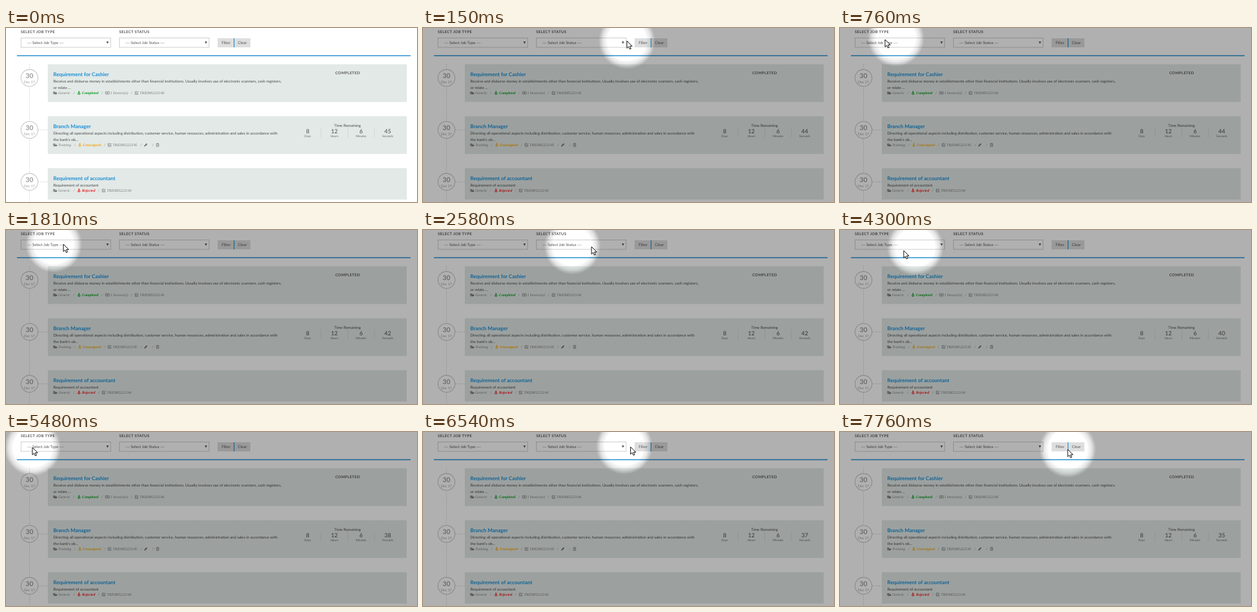
Animation, 639 px wide and 271 px high, one loop 8.18 s. Source, as an HTML page:

```html
<!DOCTYPE html>
<html lang="en">
<head>
<meta charset="utf-8">
<title>Job list tour</title>
<style>
  html, body { margin: 0; width: 100%; height: 100%; overflow: hidden; background: #fff; }
  svg { display: block; width: 100vw; height: 100vh; }
  text { font: 5.93px Lato, sans-serif; fill: #4c4c4c; text-rendering: geometricPrecision; white-space: pre; }
  .mid { text-anchor: middle; }
  .caps { font-size: 5.9px; font-weight: 700; letter-spacing: .32px; fill: #555; }
  .option { font-size: 6px; fill: #555; }
  .title { font-size: 8px; font-weight: 700; fill: #1b8fd6; }
  .meta { font: italic 5.8px "Liberation Serif", serif; fill: #777; }
  .status { font-weight: 700; }
  .day { font-size: 10.3px; font-weight: 700; fill: #9a9a9a; }
  .month { font-size: 5.3px; fill: #999; }
  .count { font-size: 9px; }
  .unit { font-size: 4.6px; fill: #666; }
</style>
</head>
<body>
<svg viewBox="0 0 639 271" preserveAspectRatio="none">
  <defs>
    <radialGradient id="light" gradientUnits="userSpaceOnUse" r="44">
      <stop offset=".68" stop-opacity="0"/>
      <stop offset=".84" stop-opacity=".1"/>
      <stop offset="1" stop-opacity=".31"/>
    </radialGradient>
    <g id="folder"><path d="M0 5V.8H2.2L2.8 1.5H5V2.4H1.6L.3 5ZM.8 5 1.9 2.8H6.4L5.2 5Z"/></g>
    <g id="anchor" fill="none" stroke="currentColor" stroke-width=".9">
      <circle cx="2.9" cy=".8" r=".6"/><path d="M2.9 1.4V5M1.5 2.3H4.3M.4 3.3Q.8 5 2.9 5T5.4 3.3"/>
    </g>
    <g id="money" fill="none" stroke="currentColor" stroke-width=".7">
      <path d="M.3 1H6V4.6H.3Z"/><circle cx="3.15" cy="2.8" r=".8"/>
    </g>
    <g id="check" fill="none" stroke="currentColor" stroke-width=".8">
      <path d="M4.8 3.3V5H.5V.8H4M1.6 2.4 2.8 3.6 5.8.6"/>
    </g>
    <g id="pencil"><path d="M0 5.4.5 3.6 3.8.3 5.2 1.7 1.9 5Z"/></g>
    <g id="trash" fill="none" stroke="currentColor" stroke-width=".6">
      <path d="M0 1.2H5M1.6 1V.3H3.4V1M.7 1.4V5.4H4.3V1.4M1.9 2.2V4.6M3.1 2.2V4.6"/>
    </g>
  </defs>
  <g id="page"></g>
  <rect id="shade" width="639" height="271" fill="url(#light)"/>
  <path id="cursor" d="M0 0V11.5L2.6 9 4.4 13 6.4 12.2 4.6 8.3H8.2Z" fill="#fff" stroke="#111"/>
</svg>
<script>
const byId = id => document.getElementById(id);
const pen = document.createElement('canvas').getContext('2d');

const text = (x, y, content, cls = '', extra = '') =>
  `<text x="${x}" y="${y}" class="${cls}" ${extra}>${content}</text>`;
const rect = (x, y, w, h, fill, extra = '') =>
  `<rect x="${x}" y="${y}" width="${w}" height="${h}" fill="${fill}" ${extra}/>`;

function dropdown(x, label, option) {
  return text(x, 8.3, label, 'caps') +
    rect(x + .3, 15.5, 139.5, 14.6, '#fff', 'stroke="#c4c4c4" stroke-width=".8"') +
    text(x + 9.7, 25, option, 'option') +
    `<path d="M${x + 133} 21h3.7l-1.85 3.7z" fill="#555"/>`;
}

function toolbar() {
  return dropdown(23, 'SELECT JOB TYPE', '--- Select Job Type ---') +
    dropdown(176, 'SELECT STATUS', '--- Select Job Status ---') +
    rect(329, 16, 51, 14.2, '#dedede') + rect(354, 16, 1.1, 14.2, '#1b8fd6') +
    text(342, 25, 'Filter', 'option mid') + text(367.5, 25, 'Clear', 'option mid') +
    rect(17, 42.4, 612, 1.5, '#2b93d1');
}

function dateBadge(cy, linked) {
  return (linked ? `<path d="M50 ${cy}H65" stroke="#ccc" stroke-width=".8" stroke-dasharray="2 1.4"/>` : '') +
    `<circle cx="36.5" cy="${cy}" r="13.2" fill="#fff" stroke="#c8c8c8" stroke-width="1.1"/>` +
    text(36.5, cy + .4, '30', 'day mid') + text(36.5, cy + 8, 'Dec 17', 'month mid');
}

// Lays out icon and label pairs in a row, with slashes between them.
function metaRow(y, items) {
  let x = 73.5;
  return items.map(([icon, label = '', color = '#777'], i) => {
    const bold = icon === 'anchor';
    pen.font = `italic ${bold ? 700 : 400} 58px "Liberation Serif", serif`;
    const left = x;
    x += pen.measureText(label).width / 10 + 18.4;
    return (i ? text(left - 5, y, '/', 'meta mid') : '') +
      `<use href="#${icon}" x="${left}" y="${y - 4.8}" fill="${color}" color="${color}"/>` +
      text(left + 7.7, y, label, bold ? 'meta status' : 'meta', `style="fill:${color}"`);
  }).join('');
}

function card({ title, lines, meta }, i) {
  const top = 56.5 + 80.9 * i;
  return rect(65, top, 558, 39 + lines.length * 9.9, '#e2e9e7') + dateBadge(top + 21.3, i > 0) +
    text(73.5, top + 18.6, title, 'title') +
    lines.map((line, row) => text(73.5, top + 28.4 + row * 9.9, line)).join('') +
    metaRow(top + 26.8 + lines.length * 9.9, meta);
}

const cards = [
  { title: 'Requirement for Cashier',
    lines: ['Receive and disburse money in establishments other than financial institutions. Usually involves use of electronic scanners, cash registers,', 'or relate ...'],
    meta: [['folder', 'Generic'], ['anchor', 'Completed', '#0a9a1c'], ['money', '1 Invoice(s)'], ['check', 'TK83M5222146']] },
  { title: 'Branch Manager',
    lines: ['Directing all operational aspects including distribution, customer service, human resources, administration and sales in accordance with', "the bank's ob..."],
    meta: [['folder', 'Training'], ['anchor', 'Unassigned', '#f5a50a'], ['check', 'TK83M5222145'], ['pencil'], ['trash']] },
  { title: 'Requirement of accountant',
    lines: ['Requirement of accountant'],
    meta: [['folder', 'Generic'], ['anchor', 'Rejected', '#f01818'], ['check', 'TK83M5222144']] }
];

function countdown() {
  const units = [['8', 'Days'], ['12', 'Hours'], ['6', 'Minutes'], ['45', 'Seconds']];
  return text(531, 154, 'Time Remaining', 'mid') + units.map(([value, unit], i) => {
    const x = 469 + i * 41.5;
    return text(x, 163.6, value, 'count mid', `id="${unit}"`) + text(x, 170, unit, 'unit mid') +
      (i ? rect(x - 21, 155, .7, 16, '#cbd2d0') : '');
  }).join('');
}

byId('page').innerHTML = toolbar() +
  '<path d="M36.5 56V271" stroke="#d4d4d4" stroke-width=".8" stroke-dasharray="2 1.4"/>' +
  cards.map(card).join('') + text(531.2, 72.4, 'COMPLETED', 'caps mid') + countdown();

const LOOP = 8180, STEP = 130, SECOND = 862;

// Where the pointer turns or rests on its tour of the filters.
const stops = [
  { t: 140, x: 317, y: 20 },
  { t: 270, x: 121, y: 12 },
  { t: 660, x: 70, y: 18 },
  { t: 1230, x: 35, y: 23 },
  { t: 1750, x: 95, y: 22 },
  { t: 2480, x: 262, y: 26 },
  { t: 3180, x: 368, y: 28 },
  { t: 4170, x: 117, y: 27 },
  { t: 4300, x: 99, y: 32 },
  { t: 4430, x: 44, y: 27 },
  { t: 5480, x: 41, y: 24 },
  { t: 6380, x: 313, y: 22 },
  { t: 6930, x: 354, y: 27 }
];

function pointerAt(time) {
  const next = stops.findIndex(stop => stop.t > time);
  if (next <= 0) return stops.at(next);
  const from = stops[next - 1], to = stops[next];
  const k = (time - from.t) / (to.t - from.t);
  return { x: from.x + (to.x - from.x) * k, y: from.y + (to.y - from.y) * k };
}

function draw(now) {
  const time = now % LOOP;
  // The screen refreshes in steps, and the light trails the pointer by one.
  const step = Math.floor((time - 10) / STEP);
  const pointer = pointerAt(step * STEP + 10);
  const light = pointerAt((step - 1) * STEP + 10);

  byId('cursor').setAttribute('transform', `translate(${pointer.x} ${pointer.y})`);
  byId('cursor').setAttribute('opacity', step < 0 ? 0 : 1);
  byId('light').setAttribute('cx', light.x);
  byId('light').setAttribute('cy', light.y);
  byId('shade').setAttribute('opacity', Math.min(1, (step + 1) / 2));
  byId('Seconds').textContent = step < 0 ? 45 : 44 - Math.floor(time / SECOND);
}

const start = performance.now();
function loop() {
  draw(performance.now() - start);
  requestAnimationFrame(loop);
}
loop();
</script>
</body>
</html>
```
